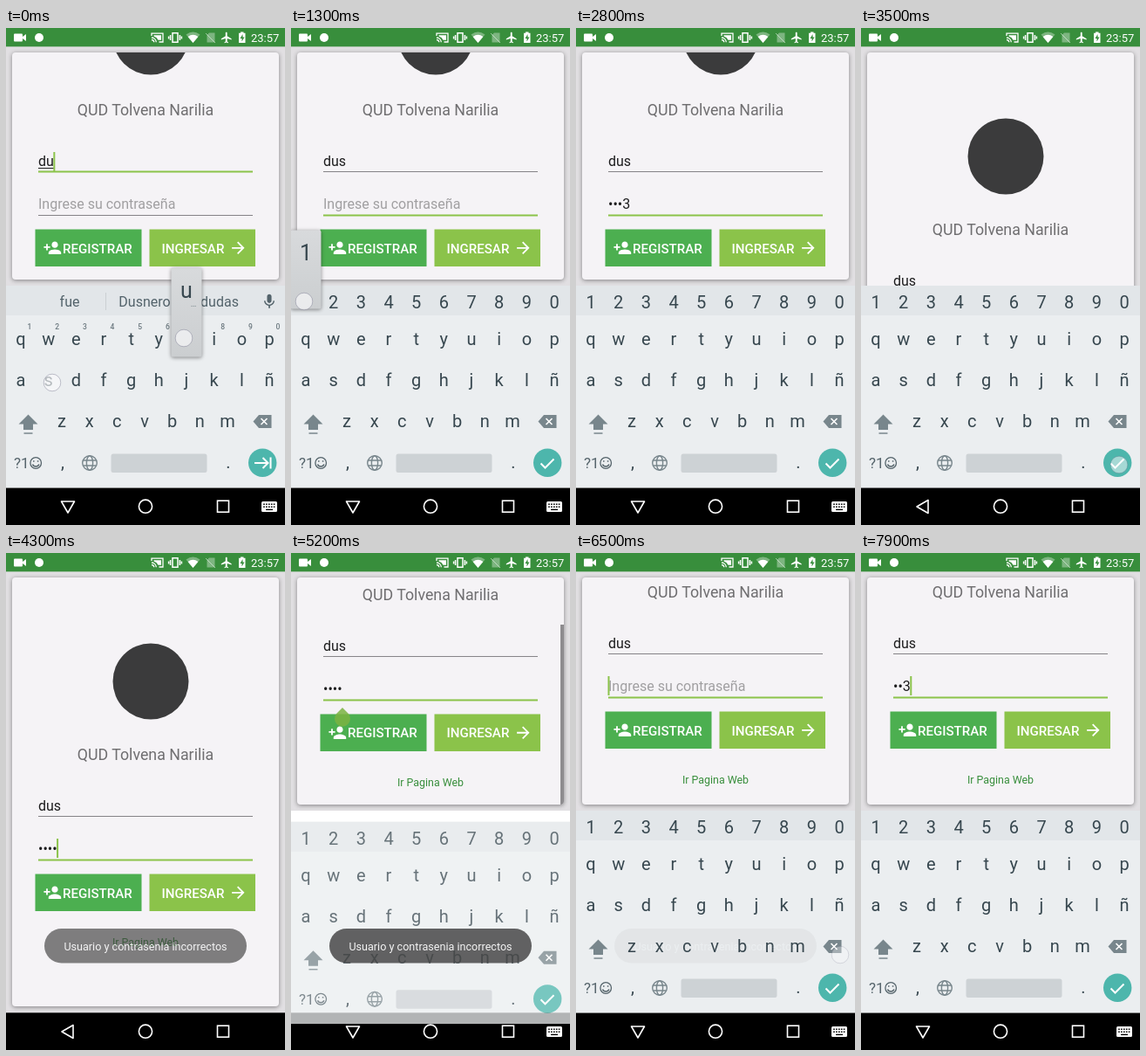
Write an HTML page that moves like this. It is 320 by 569 pixels and loops after 8000 ms.

```html
<!DOCTYPE html>
<html lang="es">
<head>
<meta charset="utf-8">
<title>Login</title>
<style>
html, body { margin: 0; width: 100%; height: 100%; overflow: hidden; background: #000; }
svg { display: block; width: 320px; height: 569px; font-family: Roboto, sans-serif; }
text { white-space: pre; }
.mid { text-anchor: middle; }
.input { font-size: 16px; fill: #1d1d1e; }
.btn { font-size: 15.1px; font-weight: 500; fill: #fff; }
.key { font-size: 20px; fill: #37474f; text-anchor: middle; }
.hintNum { font-size: 8.5px; font-weight: 500; fill: #6b787f; text-anchor: middle; }
.word { font-size: 16px; fill: #53636b; text-anchor: middle; }
.line { fill: none; stroke: #fff; }
.gray { fill: none; stroke: #78868c; }
#shade { filter: drop-shadow(0 1px 2.5px rgba(0,0,0,.42)); }
#popup { filter: drop-shadow(0 1px 2px rgba(0,0,0,.45)); }
</style>
</head>
<body>
<svg viewBox="0 0 320 569">
  <defs>
    <clipPath id="cardClip"><rect id="clipBox" x="7" y="28" width="306" height="260" rx="4"/></clipPath>
    <linearGradient id="popFill" x2="0" y2="1">
      <stop offset="0" stop-color="#d8dadc"/><stop offset="1" stop-color="#cbced0"/>
    </linearGradient>
  </defs>

  <rect width="320" height="569" fill="#fff"/>
  <rect id="page" y="21" width="320" height="274" fill="#e1dfe2"/>
  <rect id="shade" x="7" y="28" width="306" height="260" rx="4" fill="#f5f3f6"/>
  <g clip-path="url(#cardClip)">
    <g id="content">
      <circle cx="166" cy="147" r="43.5" fill="#3b3b3c"/>
      <text class="mid" x="160" y="237" font-size="17.8" fill="#6f6e70">QUD Tolvena Narilia</text>
      <text id="user" class="input" x="37" y="295"></text>
      <rect id="compose" x="37" y="297" height="1" fill="#1d1d1e"/>
      <rect id="userLine" x="37" width="246"/>
      <text id="hint" class="input" x="37" y="344" style="fill:#a09fa1">Ingrese su contraseña</text>
      <text id="pass" class="input" x="37" y="344"></text>
      <rect id="passLine" x="37" width="246"/>
      <rect id="cursor" width="2" height="22" fill="#8bc34a"/>
      <rect x="33.5" y="367.5" width="122" height="42.5" fill="#4caf50"/>
      <rect x="164.5" y="367.5" width="121.5" height="42.5" fill="#8bc34a"/>
      <rect id="ripple" x="164.5" y="367.5" width="121.5" height="42.5" fill="#fff"/>
      <path transform="translate(42.5 378) scale(.9)" fill="#fff" d="M15 12c2.21 0 4-1.79 4-4s-1.79-4-4-4-4 1.79-4 4 1.79 4 4 4zm-9-2V7H4v3H1v2h3v3h2v-3h3v-2H6zm9 4c-2.67 0-8 1.34-8 4v2h16v-2c0-2.66-5.33-4-8-4z"/>
      <text class="btn" x="65" y="394.5">REGISTRAR</text>
      <text class="btn" x="178.5" y="394.5">INGRESAR</text>
      <path transform="translate(255.5 378) scale(.9)" fill="#fff" d="M12 4l-1.41 1.41L16.17 11H4v2h12.17l-5.58 5.59L12 20l8-8z"/>
      <text class="mid" x="160" y="450" font-size="12.4" fill="#388e3c">Ir Pagina Web</text>
      <path id="handle" d="M59 360L65.5 366.5A9 9 0 1 1 52.5 366.5Z" fill="#7cb342" fill-opacity=".85"/>
    </g>
    <rect id="scrollbar" x="309" y="82" width="4" height="206" fill="#8e8c8f"/>
  </g>

  <g id="statusBar">
    <rect width="320" height="21.33" fill="#388e3c"/>
    <rect x="9" y="6.5" width="10" height="9" rx="1" fill="#fff"/>
    <path d="M19 10l4-3v8l-4-3z" fill="#fff"/>
    <circle cx="38" cy="11" r="5" fill="#fff"/>
    <path class="line" stroke-width="1.3" d="M167 9V6.2H180V16H175.5M167 13.5a3 3 0 0 1 2.8 2.8M167 11a5.5 5.5 0 0 1 5.3 5.3"/>
    <path d="M169.5 8.2H178V13.8H174.5A7.5 7.5 0 0 0 169.5 9.5Z" fill="#fff"/>
    <path class="line" stroke-width="1.5" d="M191 5.8h6v10.4h-6zM188.6 8v6M186.6 9.5v3M199.4 8v6M201.4 9.5v3"/>
    <path d="M214.5 17L206.5 7.5Q214.5 1.5 222.5 7.5Z" fill="#fff" opacity=".35"/>
    <path d="M214.5 17L208.6 10Q214.5 5.5 220.4 10Z" fill="#fff"/>
    <path d="M233 5.5h6.5v11h-9V8z" fill="#fff" opacity=".35"/>
    <path class="line" d="M229 6l11 11" opacity=".5"/>
    <path transform="translate(245.6 3.6) scale(.62)" fill="#fff" d="M21 16v-2l-8-5V3.5c0-.83-.67-1.5-1.5-1.5S10 2.67 10 3.5V9l-8 5v2l8-2.5V19l-2 1.5V22l3.5-1 3.5 1v-1.5L13 19v-5.5l8 2.5z"/>
    <path d="M267 5.8h2V4.5h3.5v1.3h2V17H267z" fill="#fff"/>
    <path d="M271.5 7l-3 5h2v3.5l3-5h-2z" fill="#388e3c"/>
    <text x="281" y="15.8" font-size="13" fill="#fff">23:57</text>
  </g>

  <rect y="526.33" width="320" height="43" fill="#000"/>
  <g class="line" stroke-width="1.6">
    <path id="back" d="M63.5 542H78.5L71 555Z" stroke-linejoin="round"/>
    <circle cx="160" cy="547.7" r="7.6"/>
    <rect x="242.5" y="541.2" width="13" height="13"/>
  </g>
  <g id="imeIcon">
    <rect x="293" y="542" width="18" height="12" rx="1.5" fill="#fff"/>
    <path stroke="#000" stroke-width="1.6" stroke-dasharray="1.6 1.3" d="M295.2 545.2H309M295.2 548.2H309"/>
    <path stroke="#000" stroke-width="1.4" d="M298 551.4H306"/>
  </g>

  <g id="keyboard">
    <rect y="295" width="320" height="231.33" fill="#ebeef0"/>
    <rect y="295" width="320" height="34" fill="#e2e6e9"/>
    <g id="words">
      <path stroke="#cbd0d3" d="M114.5 303V323M206.5 303V323"/>
      <text id="word0" class="word" x="73" y="319"></text>
      <text class="word" x="159" y="319">Dusnero</text>
      <text class="word" x="245" y="319">dudas</text>
      <path transform="translate(291.8 303) scale(.85)" fill="#53636b" d="M12 14c1.66 0 2.99-1.34 2.99-3L15 5c0-1.66-1.34-3-3-3S9 3.34 9 5v6c0 1.66 1.34 3 3 3zm5.3-3c0 3-2.54 5.1-5.3 5.1S6.7 14 6.7 11H5c0 3.41 2.72 6.23 6 6.72V21h2v-3.28c3.28-.48 6-3.3 6-6.72h-1.7z"/>
    </g>
    <g id="digits"></g>
    <g id="letters"></g>
    <path d="M25.5 442.5L14.5 453.5H20V460H31V453.5H36.5Z" fill="#78868c"/>
    <path d="M20.5 464H30.5" stroke="#78868c" stroke-width="1.5"/>
    <path d="M290 443H304.5V458H290L283.5 450.5Z" fill="#78868c"/>
    <path class="line" stroke-width="1.6" d="M292.5 447l7 7M299.5 447l-7 7"/>
    <text x="9" y="504" font-size="17" fill="#55646b">?1</text>
    <g class="gray" style="stroke:#55646b" stroke-width="1.3">
      <circle cx="34.2" cy="498" r="6.3"/>
      <path d="M30.5 499.5a4 4 0 0 0 7.4 0M31.8 495.3v1.4M36.6 495.3v1.4" stroke-width="1.5"/>
    </g>
    <text class="key" x="65" y="504">,</text>
    <g class="gray" stroke-width="1.4">
      <circle cx="96" cy="498" r="8.3"/><ellipse cx="96" cy="498" rx="3.6" ry="8.3"/>
      <path d="M88.5 495H103.5M88.5 501H103.5"/>
    </g>
    <rect x="120.5" y="487.5" width="110" height="21.5" rx="2.5" fill="#cdd2d5"/>
    <text class="key" x="255" y="504">.</text>
    <circle cx="294.2" cy="497.8" r="16.2" fill="#4db6ac"/>
    <path id="enter" class="line" stroke-width="2"/>
  </g>

  <g id="popup">
    <rect id="popBox" width="35" rx="2" fill="url(#popFill)"/>
    <text id="popKey" class="key" x="17.5" y="34" style="font-size:25px"></text>
    <text id="popMore" class="mid" x="25.5" y="44" font-size="10" fill="#78868c">…</text>
  </g>

  <g id="toast">
    <rect x="44" y="430" width="232" height="39.5" rx="19.7" fill="rgba(64,64,64,.81)"/>
    <text class="mid" x="160" y="454.5" font-size="12.6" fill="#f4f4f4">Usuario y contrasenia incorrectos</text>
  </g>
  <g id="touches"></g>
</svg>

<script>
const LOOP = 8000;
const $ = id => document.getElementById(id);
const set = (id, attrs) => { for (const k in attrs) $(id).setAttribute(k, attrs[k]); };
const show = (id, on) => set(id, { visibility: on ? 'visible' : 'hidden' });
const clamp = v => Math.max(0, Math.min(1, v));
const part = (t, start, length) => clamp((t - start) / length);
const easeOut = (p, n = 2) => 1 - (1 - p) ** n;
const colX = i => 17 + 31.67 * i;

const row = (chars, x, y, cls = 'key') => [...chars].map((c, i) =>
  `<text class="${cls}" x="${x + 31.67 * i}" y="${y}">${c}</text>`).join('');

$('letters').innerHTML = row('qwertyuiop', 17, 363) + row('asdfghjklñ', 17, 410) + row('zxcvbnm', 64, 457);
$('digits').innerHTML = row('1234567890', 17, 321);
$('words').innerHTML += row('1234567890', 27, 345, 'hintNum');

// Key balloons: from, to, label, column, key centre
const balloons = [
  [0, 100, 'u', 6, 357], [100, 300, 's', 1, 404],
  ...[[1300, 1], [1600, 2], [1900, 3], [2200, 3], [7100, 1], [7400, 2], [7700, 3]]
    .map(([t, n]) => [t, t + 150, n, n - 1, 314])
];
// Finger dots: from, release, x, y, fade
const dots = [
  [-100, 60, 204, 355, 60], [0, 200, 53, 406, 100], [300, 600, 294, 498, 150],
  ...balloons.slice(2).map(([t, , , col]) => [t, t + 100, colX(col) - 2, 313, 80]),
  [3300, 3480, 296, 500, 100], [4000, 4100, 236, 391, 120], [5000, 5080, 62, 340, 80],
  [5800, 6380, 303, 460, 250]
];
$('touches').innerHTML = dots.map(d =>
  `<circle cx="${d[2]}" cy="${d[3]}" r="9.8" fill="rgba(250,250,252,.65)" stroke="rgba(110,110,135,.4)"/>`).join('');

const firstTry = [[1400, 1], [1700, 2], [2000, 3], [2300, 3]];
const secondTry = [[7200, 1], [7500, 2], [7800, 3]];
const deletes = [5900, 6000, 6150, 6300];
const edits = [0, 100, 600, ...firstTry.map(k => k[0]), ...deletes, ...secondTry.map(k => k[0])];

function password(t) {
  const again = t >= 7000;
  const typed = (again ? secondTry : firstTry).filter(k => k[0] <= t);
  const gone = again ? 0 : deletes.filter(d => d <= t).length;
  return typed.map(([at, c], i) => i === typed.length - 1 && t - at < 1500 ? c : '•')
    .slice(0, typed.length - gone).join('');
}

function fields(t) {
  const onUser = t < 600;
  const secret = password(t);
  $('user').textContent = t < 100 ? 'du' : 'dus';
  $('pass').textContent = secret;
  show('hint', !secret);
  show('compose', onUser);
  set('compose', { width: $('user').getComputedTextLength() });
  const underline = (id, y, focus) => set(id, {
    y: focus ? y - 1 : y - .5, height: focus ? 2 : 1, fill: focus ? '#8bc34a' : '#858387'
  });
  underline('userLine', 301.5, onUser);
  underline('passLine', 351.5, !onUser);

  const last = edits.filter(e => e <= t).pop();
  const width = $(onUser ? 'user' : 'pass').getComputedTextLength();
  set('cursor', { x: 36.5 + width, y: onUser ? 279 : 327 });
  show('cursor', (t - last) % 1000 < 500);
}

function layout(t) {
  const full = t >= 3500 && t < 5100;
  const height = full ? 491 : 260;
  set('page', { height: full ? 506 : 274 });
  set('shade', { height });
  set('clipBox', { height });
  const scroll = full ? 0 : t < 3500 ? 137 : 186 * easeOut(part(t, 5100, 135), 3);
  set('content', { transform: `translate(0 ${-scroll})` });
  set('scrollbar', { opacity: t < 5100 ? 0 : 1 - part(t, 5800, 250) });
  show('handle', t >= 5100 && t < 5900);
  set('ripple', { opacity: t < 4000 ? 0 : .25 * (1 - part(t, 4000, 300)) });
  set('back', { transform: full ? 'rotate(90 71 548)' : '' });
  show('imeIcon', !full);
}

function keyboard(t) {
  const up = t < 5000 ? 1 - part(t, 3500, 200) ** 2 : easeOut(part(t, 5100, 200));
  set('keyboard', { opacity: up, transform: `translate(0 ${52 * (1 - up)})` });
  const text = t < 700;
  show('words', text);
  show('digits', !text);
  $('word0').textContent = t < 200 ? 'fue' : 'dus';
  set('enter', { d: text ? 'M285 498H300M294.5 492l6 6-6 6M303.5 491.5v13' : 'M286.5 498.5l5 5 10-10' });

  const b = balloons.find(([from, to]) => t >= from && t < to);
  set('popup', { display: b ? 'inline' : 'none' });
  if (b) {
    const [, , label, col, y] = b;
    set('popup', { transform: `translate(${colX(col) - 17.5} ${y - 82.5})` });
    set('popBox', { height: y < 320 ? 90 : 102 });
    $('popKey').textContent = label;
    show('popMore', y > 320);
  }
}

function draw(t) {
  fields(t);
  layout(t);
  keyboard(t);
  const fade = t < 6000 ? easeOut(part(t, 4020, 500)) : (1 - part(t, 6120, 500)) ** 2;
  set('toast', { opacity: fade });
  dots.forEach(([from, to, , , out], i) =>
    $('touches').children[i].setAttribute('opacity', t < from ? 0 : 1 - part(t, to, out)));
}

const start = performance.now();
function tick() {
  draw((performance.now() - start) % LOOP);
  requestAnimationFrame(tick);
}
tick();
</script>
</body>
</html>
```
